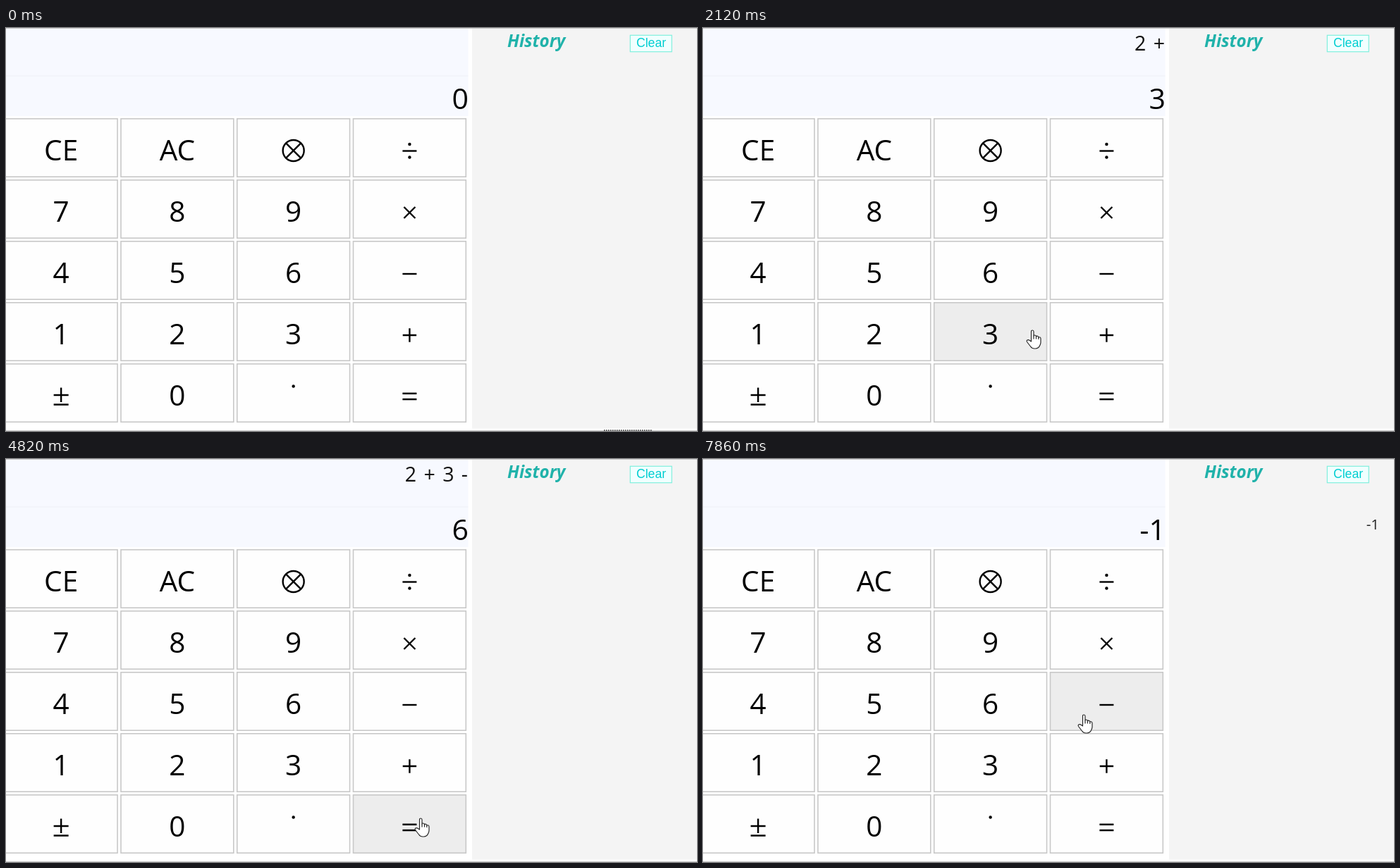
An HTML page with a canvas that plays this animation: 980 px wide and 572 px high, repeating every 8 s.

```html
<!DOCTYPE html>
<html lang="en">
<head>
<meta charset="utf-8">
<title>Calculator</title>
<style>
html, body { margin: 0; width: 100%; height: 100%; overflow: hidden; background: #fff; }
canvas { display: block; }
</style>
</head>
<body>
<canvas id="stage" width="980" height="572"></canvas>
<script>
const ctx = document.getElementById('stage').getContext('2d');
const LOOP = 8000;
const STEP = 77; // time between two pointer updates
const ENTER = 110; // the pointer comes in
const PRESS = 70; // how long a key stays down
const SANS = '"Open Sans", "Noto Sans", sans-serif';
const KEYS = ['CE', 'AC', '⊗', '÷', '7', '8', '9', '×', '4', '5', '6', '−',
  '1', '2', '3', '+', '±', '0', '.', '='];

// Operator shapes around the middle of a key
const SYMBOLS = {
  '⊗': 'M15 4a15 15 0 1 1-30 0a15 15 0 1 1 30 0M-10.6-6.6L10.6 14.6M10.6-6.6L-10.6 14.6',
  '÷': 'M-10 4.5H10',
  '×': 'M-8-3L8 13M8-3L-8 13',
  '−': 'M-10 5H10',
  '+': 'M-9.7 5H9.7M0-4.7V14.7',
  '±': 'M-10.5 3H10.5M0-7.5V13M-10.5 16.5H10.5',
  '.': '',
  '=': 'M-10 .8H10M-10 9H10'
};
for (const key in SYMBOLS) SYMBOLS[key] = new Path2D(SYMBOLS[key]);
const DOTS = { '÷': [-5, 13.5], '.': [-9.5] };

const HAND = new Path2D('M7.5 17V3Q7.5 1 9.3 1Q11 1 11 3V9Q11.2 7.8 12.6 8Q14.4 8.2 14.5 10' +
  'Q15 9 16.3 9.2Q17.8 9.5 17.8 11.2Q18.5 10.5 19.6 10.8Q21 11.2 21 13V18Q21 20 20 22' +
  'Q18 27 13.5 27H12Q8.5 27 6.5 24L1.5 17.5Q.5 16 1.8 15Q3.3 14 5 15.2Z');
const KNUCKLES = new Path2D('M11 9V13.5M14.5 10V13.5M17.8 11V14');

// Pointer moves: start, end, x, y
const ENTRY = [640, 590];
const MOVES = [[ENTER, 495, 440, 450], [572, 880, 250, 442], [970, 1110, 434, 449],
  [1190, 1650, 572, 437], [1810, 2120, 458, 428], [2200, 2580, 572, 354],
  [2730, 3340, 427, 347], [4430, 4820, 579, 509], [5750, 5980, 385, 285],
  [6060, 6060, 310, 294], [6140, 6210, 244, 267], [6610, 6990, 72, 166],
  [7140, 7860, 531, 362]];

const CLICKS = [[970, '2'], [1650, '+'], [2040, '3'], [2510, '-'], [3190, '6'], [5120, '=']];

// Each move eases out in visible steps
function pointerAt(t) {
  let [x, y] = ENTRY;
  for (const [start, end, toX, toY] of MOVES) {
    if (t < start) break;
    const steps = Math.round((end - start) / STEP) + 1;
    const done = Math.floor((t - start + 15) / STEP) + 1;
    const p = Math.min(1, done / steps);
    const eased = p * (2 - p);
    x += (toX - x) * eased;
    y += (toY - y) * eased;
  }
  return [Math.round(x), Math.round(y)];
}

function calculate(t) {
  let expression = '', value = '0', result = '', total = 0, sign = 1;
  for (const [time, key] of CLICKS) {
    if (time > t) break;
    if (key >= '0' && key <= '9') {
      value = key;
      continue;
    }
    total += sign * value;
    if (key === '=') {
      expression = '';
      value = result = String(total);
    } else {
      sign = key === '+' ? 1 : -1;
      expression += `${value} ${key} `;
    }
  }
  return { expression: expression.trim(), value, result };
}

const keyBox = i => ({ x: i % 4 * 164.75 - 2.55, y: Math.floor(i / 4) * 87 + 128, w: 161.4, h: 84 });

function box(x, y, w, h, color) {
  ctx.fillStyle = color;
  ctx.fillRect(x, y, w, h);
}

function text(string, x, y, font, color, align = 'left') {
  ctx.font = font;
  ctx.fillStyle = color;
  ctx.textAlign = align;
  ctx.fillText(string, x, y);
}

function drawSymbol(label, x, y) {
  ctx.save();
  ctx.translate(x, y);
  ctx.strokeStyle = ctx.fillStyle = '#000';
  ctx.lineWidth = 2.4;
  ctx.stroke(SYMBOLS[label]);
  for (const dotY of DOTS[label] || []) {
    ctx.beginPath();
    ctx.arc(0, dotY, 2.2, 0, 7);
    ctx.fill();
  }
  ctx.restore();
}

function drawKey(label, i, [tipX, tipY], pressed) {
  const { x, y, w, h } = keyBox(i);
  const hovered = tipX > x && tipX < x + w && tipY > y && tipY < y + h;
  box(x, y, w, h, '#c8c8c8');
  box(x + 1.6, y + 1.6, w - 3.2, h - 3.2, !hovered ? '#fefefe' : pressed ? '#e2e2e2' : '#ededed');
  const cx = x + w / 2, cy = y + h / 2;
  if (SYMBOLS[label]) drawSymbol(label, cx, cy);
  else text(label, cx, cy + 17.5, '40.5px ' + SANS, '#000', 'center');
}

function drawPointer(x, y) {
  ctx.save();
  ctx.translate(x, y);
  ctx.fillStyle = '#fff';
  ctx.strokeStyle = '#222';
  ctx.lineWidth = 1.15;
  ctx.lineJoin = 'round';
  ctx.fill(HAND);
  ctx.stroke(HAND);
  ctx.stroke(KNUCKLES);
  ctx.restore();
}

function draw(t) {
  const { expression, value, result } = calculate(t);

  box(0, 0, 980, 572, '#fff');
  box(0, 0, 655.5, 125, '#f7f9ff');
  box(0, 67.5, 655.5, 1, '#eff0f5');
  box(661, 0, 319, 568.5, '#f4f4f4');
  box(0, 0, 980, 1, '#c9c9c9');
  box(0, 571, 980, 1, '#c9c9c9');

  ctx.wordSpacing = '3px';
  text(expression, 655, 32, '28.5px ' + SANS, '#111', 'right');
  ctx.wordSpacing = '0px';
  text(value, 656, 115, '41px ' + SANS, '#000', 'right');

  // The highlight trails the fingertip by one step
  const [trailX, trailY] = pointerAt(t - STEP);
  const pressed = CLICKS.some(([time]) => t >= time - PRESS && t < time);
  KEYS.forEach((label, i) => drawKey(label, i, [trailX + 8, trailY + 1], pressed));

  text('History', 711, 27, 'italic bold 24.2px ' + SANS, '#20b2aa');
  box(884.7, 9.7, 60.1, 24.6, '#7fefdc');
  box(885.9, 10.9, 57.7, 22.2, '#f0ffff');
  text('Clear', 915, 27, '17.6px "Liberation Sans", Arial, sans-serif', '#00ced1', 'center');
  text(result, 959, 100, '20.5px ' + SANS, '#222', 'right');

  if (t < ENTER) {
    for (let x = 848; x < 917; x += 3) box(x, 570, 1.5, 2, '#555');
  } else {
    drawPointer(...pointerAt(t));
  }
}

function tick() {
  draw(performance.now() % LOOP);
  requestAnimationFrame(tick);
}
tick();
</script>
</body>
</html>
```
